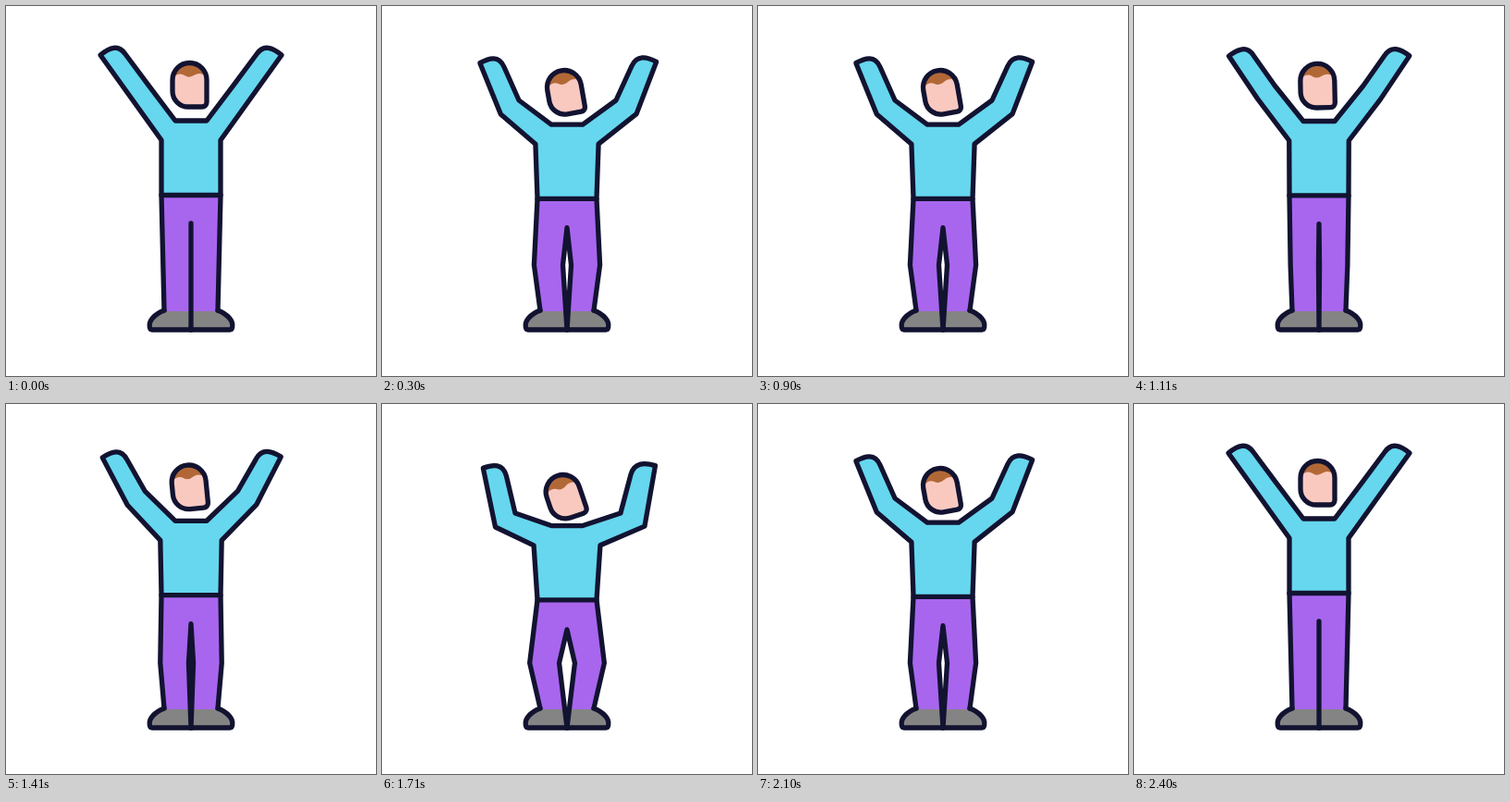
An HTML page for the animation above (4430 ms loop, 400x400 px).

```html
<!DOCTYPE html>
<html lang="en">
<head>
<meta charset="utf-8">
<title>Cheering figure</title>
<style>
  html, body { margin: 0; width: 100%; height: 100%; overflow: hidden; background: #fff; }
  svg { display: block; width: 100%; height: 100%; }
  .line { fill: none; stroke: #121331; stroke-width: 5.3; stroke-linecap: round; stroke-linejoin: round; }
  #body { fill: #66d7ee; }
</style>
</head>
<body>
<svg viewBox="0 0 400 400">
  <defs>
    <path id="skull" d="M180 80A18.5 18.5 0 0 1 217 80V104a5 5 0 0 1-5 5H197A17 17 0 0 1 180 92Z"/>
    <path id="shoe" d="M171 329C161 333 154 340 155.3 347Q155.8 350 158 350H200"/>
    <clipPath id="face"><use href="#skull"/></clipPath>
  </defs>
  <path id="trousers" fill="#a866ee"/>
  <g id="soles" fill="#848484">
    <path d="M171 330C161 333 154 340 155.3 347Q155.8 350 158 350H200V330Z"/>
    <path d="M229 330C239 333 246 340 244.7 347Q244.2 350 242 350H200V330Z"/>
  </g>
  <path id="gap" fill="#fff"/>
  <path id="legs" class="line"/>
  <use href="#shoe" class="line"/>
  <use href="#shoe" class="line" transform="matrix(-1 0 0 1 400 0)"/>
  <path id="body" class="line"/>
  <g id="head">
    <use href="#skull" fill="#f9c9c0"/>
    <path clip-path="url(#face)" fill="#b26836"
      d="M178 79Q187 70.5 193 75Q198 78.5 204 74.5Q210 70.5 219 77V58H178Z"/>
    <use href="#skull" class="line"/>
  </g>
</svg>
<script>
  const LOOP = 4430, STEP = 30, HALF = 600, ACTIVE = 2400;
  const $ = id => document.getElementById(id);
  const setPath = (id, d) => $(id).setAttribute('d', d);

  // Squat amount: 0 upright, 1 lowest; two eased dips, then rest
  function squat(t) {
    if (t >= ACTIVE) return 0;
    const p = t % (2 * HALF) / HALF;
    const x = p > 1 ? 2 - p : p;
    return x * x * (3 - 2 * x);
  }

  function pose(s) {
    const mix = (a, b) => (a + (b - a) * s).toFixed(2);
    const pt = (x, y, x2, y2) => mix(x, x2) + ' ' + mix(y, y2);

    const waist = mix(204.5, 212.3);
    const kneeL = pt(169.8, 280, 159, 280), kneeR = pt(230.2, 280, 241, 280);
    const innerL = pt(200, 280, 191, 280), innerR = pt(200, 280, 209, 280);
    const crotch = pt(200, 235, 200, 244.5);
    const inside = `M200 350L${innerL}L${crotch}L${innerR}L200 350`;

    setPath('trousers', `M168 ${waist}L${kneeL}L171 330H229L${kneeR}L232 ${waist}Z`);
    setPath('gap', inside + 'Z');
    setPath('legs', `M168 ${waist}L${kneeL}L171 329M232 ${waist}L${kneeR}L229 329${inside}`);

    setPath('body', `M168 ${waist}
      L${pt(168, 145, 163.8, 153.3)}
      L${pt(135, 99, 121.7, 135.2)}
      L${pt(102, 53, 109.8, 70.3)}
      C${pt(112, 45, 120.5, 66.5)} ${pt(121.5, 41, 131.5, 65.5)} ${pt(129, 52, 134.8, 79.5)}
      L${pt(152.7, 83.8, 143.4, 120.2)}
      L${pt(183, 124, 183, 132.1)}
      L${pt(217, 124, 217, 132.1)}
      L${pt(247.3, 83.8, 258.6, 120.2)}
      L${pt(271, 52, 268.8, 78)}
      C${pt(278.5, 41, 272.5, 64)} ${pt(288, 45, 284, 64.5)} ${pt(298, 53, 295.3, 67.5)}
      L${pt(265, 99, 285.2, 134.3)}
      L${pt(232, 145, 236.2, 153.3)}
      L232 ${waist}Z`);

    $('head').setAttribute('transform',
      `translate(${pt(0, 0, -3, 16)}) rotate(${mix(0, -20)} 198.5 80)`);
  }

  const start = performance.now();
  function frame(now) {
    const t = Math.max(0, now - start) % LOOP;
    pose(squat(Math.floor(t / STEP) * STEP));
    requestAnimationFrame(frame);
  }
  frame(start);
</script>
</body>
</html>
```
